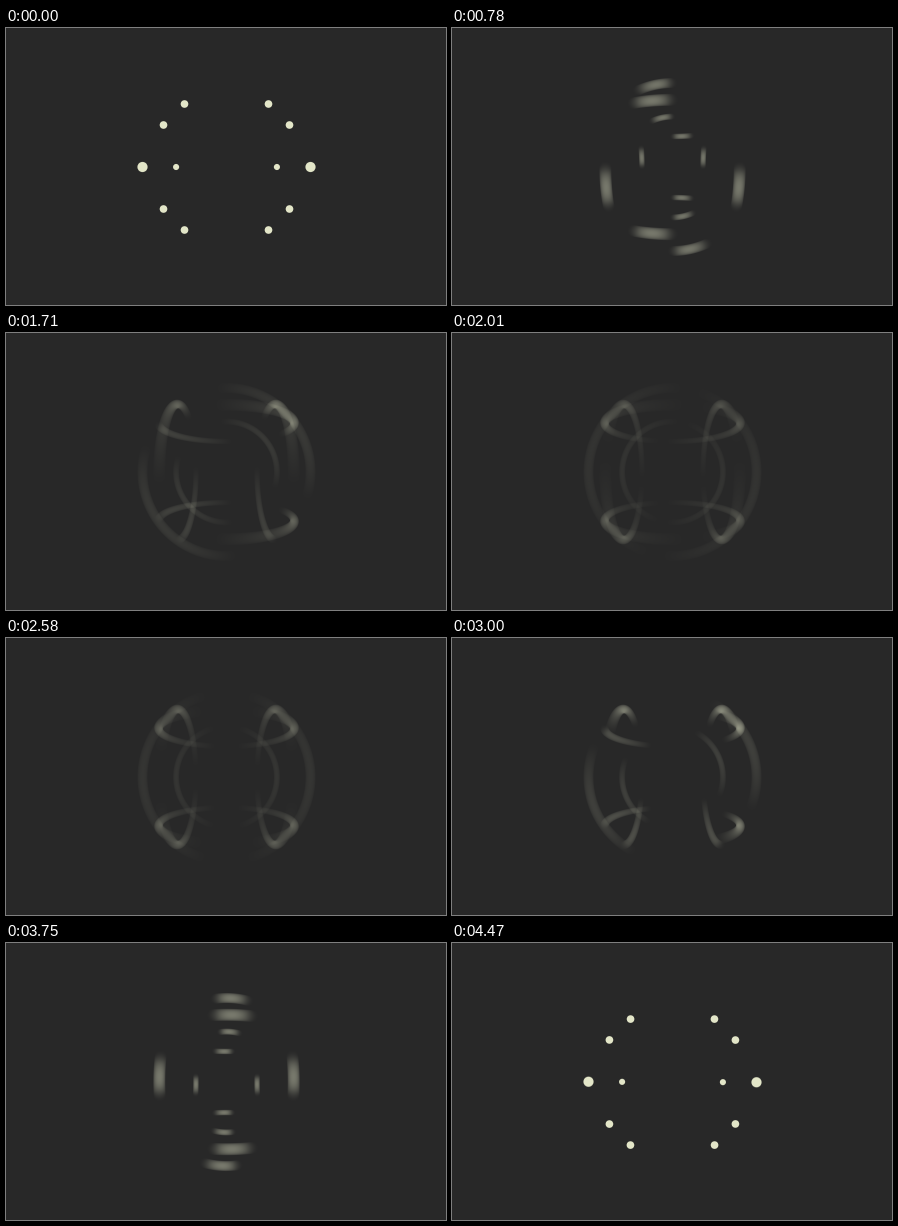
Recreate the animation shown at these times as an HTML page with a canvas. Size 440x277 px, loop 4500 ms.

```html
<!DOCTYPE html>
<html lang="en">
<head>
<meta charset="utf-8">
<title>Spinning dots</title>
<style>
html, body { margin: 0; width: 100%; height: 100%; overflow: hidden; background: #282828; }
canvas { display: block; }
</style>
</head>
<body>
<canvas id="stage" width="440" height="277"></canvas>
<script>
const W = 440, H = 277, LOOP = 4500, STEP = 30;
const CX = 220.5, CY = 139;
const RING = 63, OFFSET = 42, CAMERA = 168, DOT = 3.8;
const HALF_SPIN = 10 * Math.PI;         // turned in each half of the loop
const SHUTTER = 86, SAMPLES = 180;      // motion blur in ms
const BACK = [40, 40, 40], INK = [227, 230, 200];

const ctx = document.getElementById('stage').getContext('2d');
const image = ctx.createImageData(W, H);
const light = new Float32Array(W * H);

const ramp = u => 0.42 * u ** 2 + 0.58 * u ** 4.3;

function spin(t) {
  const u = ((t + LOOP) % LOOP) / LOOP * 2;
  return HALF_SPIN * (u < 1 ? ramp(u) : 2 - ramp(2 - u));
}

// Adds one soft-edged disc, seen in perspective
function addDot(x, y, z, weight) {
  const scale = CAMERA / (CAMERA - z);
  const px = CX + x * scale, py = CY + y * scale, r = DOT * scale;
  for (let j = Math.floor(py - r - 1); j <= py + r + 1; j++) {
    for (let i = Math.floor(px - r - 1); i <= px + r + 1; i++) {
      const cover = r + 0.5 - Math.hypot(i + 0.5 - px, j + 0.5 - py);
      if (cover > 0) light[j * W + i] += weight * Math.min(1, cover);
    }
  }
}

// Two opposite dots on each of six rings, a pair of rings per axis
function addDots(angle, weight) {
  for (const turn of [1, -1]) {
    const c = turn * RING * Math.cos(angle), s = turn * RING * Math.sin(angle);
    for (const d of [OFFSET, -OFFSET]) {
      addDot(d, c, -s, weight);
      addDot(-c, d, -s, weight);
      addDot(-c, s, d, weight);
    }
  }
}

function draw(t) {
  light.fill(0);
  for (let k = 0; k < SAMPLES; k++) {
    const x = (2 * k + 1) / SAMPLES - 1;
    addDots(spin(t + x * SHUTTER / 2), 1.5 * (1 - x * x) / SAMPLES);
  }
  for (let i = 0; i < light.length; i++) {
    const a = Math.min(1, light[i]);
    for (let c = 0; c < 3; c++) image.data[4 * i + c] = BACK[c] + (INK[c] - BACK[c]) * a;
    image.data[4 * i + 3] = 255;
  }
  ctx.putImageData(image, 0, 0);
}

const start = performance.now();
let shown = -1;
function tick() {
  const t = Math.floor(Math.max(0, performance.now() - start) % LOOP / STEP) * STEP;
  if (t !== shown) draw(shown = t);
  requestAnimationFrame(tick);
}
tick();
</script>
</body>
</html>
```
